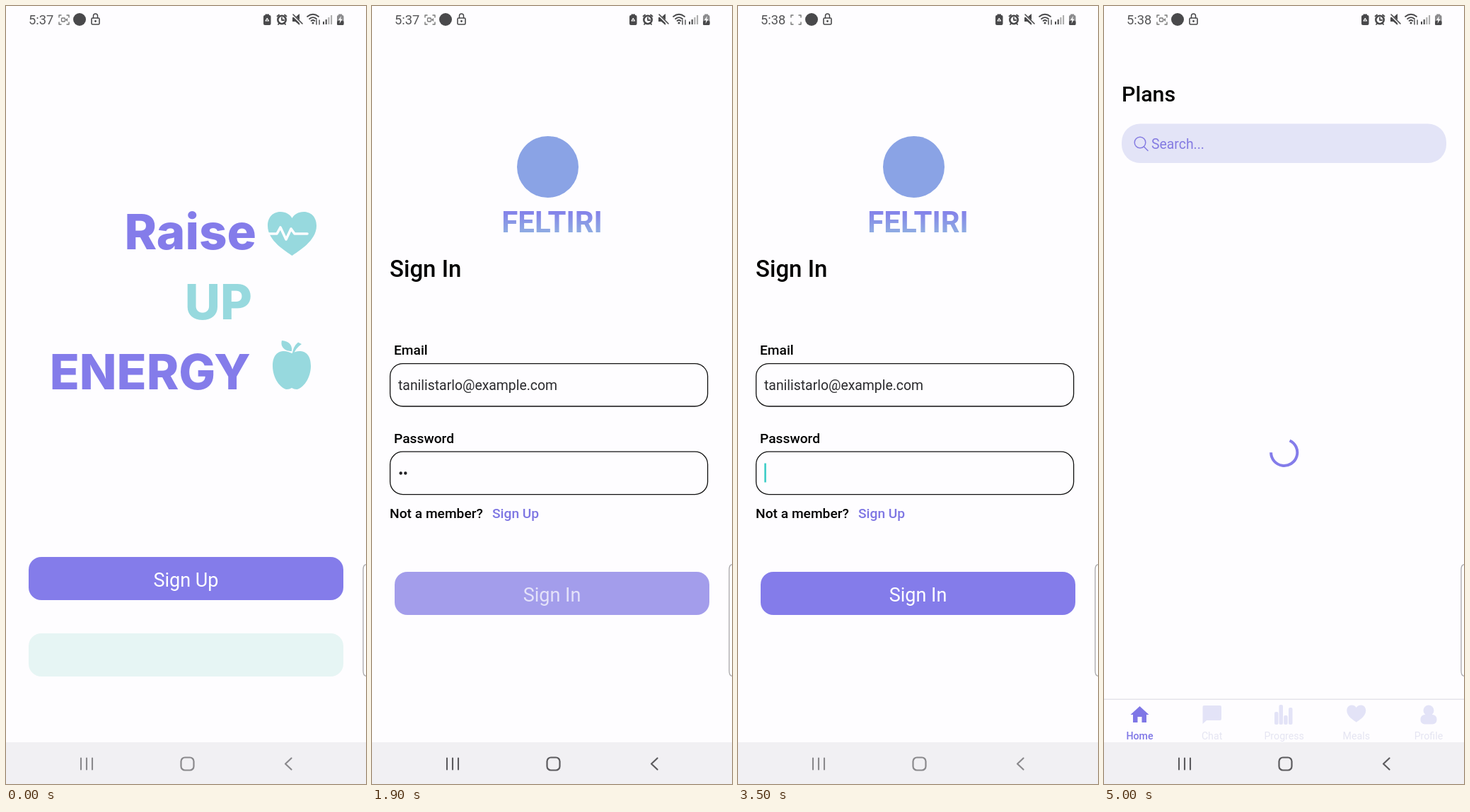
These frames come from a looping animation (509x1100 px, 5.1 s). An HTML page:

```html
<!DOCTYPE html>
<html lang="en">
<head>
<meta charset="utf-8">
<title>Sign in walkthrough</title>
<style>
html, body { margin: 0; width: 100%; height: 100%; overflow: hidden; background: #fefdff; }
svg { display: block; width: 100%; height: 100%; font-family: Roboto, sans-serif; }
</style>
</head>
<body>
<svg id="stage" viewBox="0 0 509 1100"></svg>
<script>
const STEP = 100, STEPS = 51;
const PURPLE = '#847cea', TEAL = '#97d9de', INK = '#222225';
const MAIL = 'tanilistarlo@example.com';

// Each entry changes the screen state from its step onward.
const timeline = [
  [0, { page: landing, clock: '5:37', mail: '', pw: '', focus: '', kb: 0, scroll: 0, bar: 0, caps: 1, pop: '', press: 0, nav: '#8a898c', rec: 1 }],
  [1, { page: login }],
  [3, { focus: 'mail' }],
  [4, { kb: .5 }],
  [5, { kb: 1 }],
  [9, { mail: MAIL }],
  [11, { focus: 'pw', scroll: 1, bar: 1 }],
  [13, { focus: '', pop: '1' }],
  [14, { focus: 'pw', pw: '1', pop: '2', bar: 0 }],
  [15, { pw: '•2', pop: '' }],
  [16, { pw: '••', kb: .5 }],
  [17, { kb: 0, scroll: 0, focus: '' }],
  [19, { press: 1, nav: '#5c5b5e' }],
  [21, { press: 0 }],
  [23, { nav: '#8a898c' }],
  [25, { kb: 1, scroll: 1, bar: 1, caps: 0, focus: 'pw' }],
  [26, { pw: '•' }],
  [27, { pw: '' }],
  [28, { bar: 0 }],
  [31, { clock: '5:38' }],
  [32, { kb: .5 }],
  [33, { kb: 0, scroll: 0 }],
  [35, { rec: 0 }],
  [36, { kb: 1, scroll: 1, bar: 1, rec: 1 }],
  ...[1, 2, 3, 4, 5, 6].map(n => [36 + n, { pop: '' + n, pw: typed(n - 1) }]),
  [39, { bar: 0 }],
  [43, { pop: '', pw: typed(6) }],
  [44, { pw: '••••••', kb: .5 }],
  [45, { kb: 0, scroll: 0, focus: '' }],
  [46, { press: 1, nav: '#5c5b5e' }],
  [49, { page: plans }]
];

function typed(n) { return n ? '•'.repeat(n - 1) + n : ''; }

const text = (s, x, y, size, fill = INK, more = '') =>
  `<text x="${x}" y="${y}" font-size="${size}" fill="${fill}" ${more}>${s}</text>`;
const mid = (s, x, y, size, fill, more = '') => text(s, x, y, size, fill, 'text-anchor="middle" ' + more);
const rect = (x, y, w, h, r, fill, more = '') =>
  `<rect x="${x}" y="${y}" width="${w}" height="${h}" rx="${r}" fill="${fill}" ${more}/>`;
const circle = (x, y, r, fill, more = '') => `<circle cx="${x}" cy="${y}" r="${r}" fill="${fill}" ${more}/>`;
const shape = (d, fill) => `<path d="${d}" fill="${fill}"/>`;
const line = (d, stroke, width = 2) =>
  `<path d="${d}" fill="none" stroke="${stroke}" stroke-width="${width}" stroke-linecap="round" stroke-linejoin="round"/>`;
const group = (s, more) => `<g ${more}>${s}</g>`;
const bold = 'font-weight="700"', medium = 'font-weight="500"';

const heart = 'M404.5 353C396 347 370 332 370 311C370 297 379 291 388 291C396 291 402 295 404.5 300C407 295 413 291 421 291C430 291 439 297 439 311C439 332 413 347 404.5 353Z';

function statusBar(s) {
  const c = '#49494b';
  return text(s.clock, 32, 26, 18.3, '#555557')
    + line('M75 16V13H78M86 13H89V16M89 23V26H86M78 26H75V23', '#777', 1.4)
    + (s.rec ? rect(78.5, 17, 5, 5, 1, 'none', 'stroke="#777" stroke-width="1.3"') + shape('M84 19.5L87 17V22Z', '#777') : '')
    + circle(104, 19, 9, c)
    + rect(121, 17, 11, 9, 1.5, 'none', `stroke="${c}" stroke-width="1.6"`)
    + line('M123.5 17V14Q123.5 11 126.5 11T129.5 14V17', c, 1.5) + circle(126.5, 21.5, 1.4, c)
    + rect(364, 13, 10.5, 14, 2, c) + rect(366.5, 11.5, 5.5, 3, 0, c)
    + line('M367 21L369.2 17.5L371.5 21Z', '#fff', 1.2)
    + circle(390, 19.5, 5.7, 'none', `stroke="${c}" stroke-width="2.6"`)
    + line('M390 16.5V20H393M383.5 14.5L386 12.5M396.5 14.5L394 12.5M385 26L386.5 24M395 26L393.5 24', c, 1.8)
    + shape('M405 16H409L415 11V27L409 22H405Z', c) + line('M405 12L419 26', '#fefdff', 3) + line('M406 12L419 25', c, 1.6)
    + line('M426 15Q434 8.5 442 15M429 18.2Q434 14 439 18.2M431.5 21Q434 19 436.5 21', c, 1.8)
    + circle(434, 24, 1.6, c) + line('M439 26V20M443 20V26', c, 1.4)
    + [0, 1, 2, 3].map(i => rect(448 + i * 3.7, 22 - i * 3, 2, 4 + i * 3, 0, i < 2 ? c : '#aaa')).join('')
    + rect(468, 13, 9.5, 14, 2, '#8b8b8d') + rect(470.2, 11.5, 5, 3, 0, '#8b8b8d') + rect(468, 21, 9.5, 6, 1.5, c)
    + shape('M474 14L470 20H472.5L471.5 25L475.5 18.5H473Z', '#fff');
}

function navBar(s) {
  const c = s.kb ? '#88878a' : s.nav;
  let out = s.kb ? '' : rect(0, 1041, 509, 59, 0, '#f1f0f3');
  out += line('M106 1063.5V1079.5M114 1063.5V1079.5M122 1063.5V1079.5', c, 2.1)
    + rect(247.5, 1062.5, 18, 18, 5.5, 'none', `stroke="${c}" stroke-width="2.2"`)
    + line(s.kb ? 'M391 1067.5L399.5 1076L408 1067.5' : 'M403.5 1063.5L395 1071.5L403.5 1079.5', c, 2.2);
  if (s.kb) {
    for (let i = 0; i < 15; i++) out += rect(469.5 + i % 5 * 5, 1066 + (i / 5 | 0) * 4, 2.4, 2, 0, c);
    out += rect(475, 1077.5, 12, 2, 0, c);
  }
  return out;
}

const edgeHandle = '<path d="M510 789.5Q505 789.5 505 797V940Q505 947.5 510 947.5" fill="#fff" stroke="#a8a7aa" stroke-width="1.3"/>';

function button(label, y, pressed) {
  return rect(32, y, 445, 61, 18, pressed ? '#a39deb' : PURPLE)
    + mid(label, 254.5, y + 41.5, 27, pressed ? '#e4e2f9' : '#fff');
}

function landing() {
  const word = (s, x, y, c) => text(s, x, y, 69, c, 'font-weight="800" text-anchor="end" style="font-family:Inter,sans-serif"');
  return word('Raise', 354, 344, PURPLE) + word('UP', 348, 443, TEAL) + word('ENERGY', 346, 542, PURPLE)
    + shape(heart, TEAL) + line('M371 322H383L388 313L396 330L403 315L408 322H426', '#fefdff', 3.6)
    + shape('M404 491C412 486 431 484 431 509C431 526 420 541 411 542Q407 542 404 540Q401 542 397 542C388 541 377 526 377 509C377 484 396 486 404 491Z', TEAL)
    + shape('M404 488C391 488 388 479 390 473C400 474 405 479 404 488Z', TEAL)
    + shape('M404.5 493Q406 481 413 475.5L418 478Q409 484 406.5 493Z', TEAL)
    + button('Sign Up', 779) + rect(32, 887, 445, 61, 18, '#e6f5f4');
}

function field(label, y) {
  return text(label, 31, y - 12, 19.2, '#000', medium)
    + rect(25.6, y + .6, 449, 60.4, 18, 'none', 'stroke="#111" stroke-width="1.3"');
}

function caret(x, y) { return rect(x - 1.2, y, 2.5, 27, 0, '#35cbc5'); }

function login(s) {
  const dots = s.pw.split('•').length - 1, digit = s.pw.slice(dots);
  const end = 37.5 + dots * 6.6;
  let out = '<defs><linearGradient id="fade" gradientUnits="userSpaceOnUse" x1="0" y1="289" x2="0" y2="321">'
    + '<stop stop-color="#837fea"/><stop offset="1" stop-color="#8fade2"/></linearGradient></defs>'
    + circle(248.5, 227.5, 43.5, '#8aa3e5')
    + mid('FELTIRI', 254.5, 320, 42, 'url(#fade)', bold)
    + text('Sign In', 25, 383, 33, '#000', medium)
    + field('Email', 505) + text(s.mail, 37, 543, 19.4, '#2b2b2e')
    + field('Password', 629.6);
  for (let i = 0; i < dots; i++) out += circle(40.7 + i * 6.6, 660.5, 2.2, INK);
  out += text(digit, end, 667.5, 19.4);
  if (s.focus == 'pw') out += caret(end + 1 + digit.length * 10.5, 646.5);
  if (s.focus == 'mail') out += caret(38.5 + (s.mail ? 225 : 0), 522);
  out += text('Not a member?', 25, 724, 19.2, '#000', medium)
    + text('Sign Up', 170, 724, 19.2, '#7e76e3', medium)
    + button('Sign In', 800, s.press);
  out = group(out, `transform="translate(0 ${s.scroll * -12.7})"`);
  return s.bar && s.kb ? out + rect(479, 110, 5, 438, 0, '#b5b4b8') : out;
}

function key(x, y, w, h, label, size, fill = '#fbfafd', ink = INK) {
  return rect(x, y + 1.3, w, h, 6, '#cfced2') + rect(x, y, w, h, 6, fill)
    + mid(label, x + w / 2, y + h / 2 + size * .36, size, ink);
}

function gear(cx, cy) {
  let d = '';
  for (let i = 0; i < 48; i++) {
    const a = i * Math.PI / 24, r = 9.8 + 1.2 * Math.tanh(3 * Math.cos(6 * a));
    d += (i ? 'L' : 'M') + (cx + r * Math.sin(a)).toFixed(1) + ' ' + (cy - r * Math.cos(a)).toFixed(1);
  }
  return line(d + 'Z', INK, 2) + circle(cx, cy, 3.6, 'none', `stroke="${INK}" stroke-width="2"`);
}

function keyboard(s) {
  const pitch = 49.6, w = 42.5, gray = '#cbcacd', pale = '#bebdc0', blue = '#1479e0';
  const row = (chars, x, y, h, size) => [...chars].map((c, i) => key(x + i * pitch, y, w, h, c, size)).join('');
  const letters = (chars, x, y) => row(s.caps ? chars : chars.toLowerCase(), x, y, 52, s.caps ? 28 : 30);
  let out = rect(0, 679, 509, 421, 0, '#e4e3e6') + rect(0, 679, 509, 48, 0, '#ebeaed')
    + circle(55.5, 703, 10.3, 'none', `stroke="${pale}" stroke-width="1.7"`)
    + circle(51.5, 700, 1.4, pale) + circle(59.5, 700, 1.4, pale) + line('M50.5 706Q55.5 711 60.5 706', pale, 1.7)
    + line('M161 693H175Q178 693 178 696V704L169 713H161Q158 713 158 710V696Q158 693 161 693M178 704H172Q169 704 169 707V713M163 706Q165 709 168 707', pale, 1.7)
    + circle(164, 700, 1.3, pale) + circle(172, 700, 1.3, pale)
    + rect(276.5, 692.5, 7, 13.5, 3.5, 'none', `stroke="${pale}" stroke-width="1.7"`)
    + line('M272.5 702Q273 709 280 709T287.5 702M280 709V713', pale, 1.7)
    + gear(391.5, 703)
    + [472, 479, 486].map(x => circle(x, 703.5, 2.3, INK)).join('')
    + row('1234567890', 10, 738, 41, 27)
    + letters('QWERTYUIOP', 10, 788) + letters('ASDFGHJKL', 35.5, 849.5) + letters('ZXCVBNM', 85, 911)
    + key(10, 911, 60, 52, '', 1, gray)
    + line('M40 925.5L51 937.5H45.3V948H34.7V937.5H29Z', s.caps ? blue : INK, 2)
    + key(439.5, 911, 59.5, 52, '', 1, gray)
    + line('M456 937L463.5 928H480Q482.5 928 482.5 930V944Q482.5 946 480 946H463.5ZM468 933.5L475 940.5M475 933.5L468 940.5', INK, 2)
    + key(10, 972, 67, 53, '!#1', 24, gray)
    + key(85, 972, 41.5, 53, '', 1) + mid(',', 106, 1013, 31, INK, medium)
    + key(135, 972, 239.5, 53, 'English (UK)', 16.6)
    + line('M169.5 993.5L164.5 998.5L169.5 1003.5M340 993.5L345 998.5L340 1003.5', INK, 1.9)
    + key(383, 972, 41.5, 53, '', 1) + mid('.', 403.5, 1011, 31, INK, medium)
    + key(432, 972, 67, 53, 'Done', 19.6, gray, blue);
  if (s.pop) {
    const x = Math.max(10, 31.3 + (s.pop - 1) * pitch - 38.3);
    out += rect(x - 1, 630, 78.5, 100.5, 10, '#d3d2d6', 'opacity=".7"') + rect(x, 630, 76.5, 98.5, 10, '#fbfafc')
      + mid(s.pop, x + 38.3, 697, 43);
  }
  return out;
}

function plans(s, step) {
  const pale = '#e3e3f7', a = step == 50 ? -65 : -150, sweep = step == 50 ? 245 : 200;
  const at = deg => `${254.7 + 18.6 * Math.cos(deg * Math.PI / 180)} ${631.3 + 18.6 * Math.sin(deg * Math.PI / 180)}`;
  return text('Plans', 25, 135, 30.3, '#000', medium)
    + rect(25, 166.5, 459, 55.5, 26, '#e3e4f7')
    + circle(51, 193, 7.8, 'none', 'stroke="#857ce2" stroke-width="1.5"') + line('M56.5 199L62 204.5', '#857ce2', 1.5)
    + text('Search...', 67, 202, 19.4, '#857ce2')
    + `<path d="M${at(a)}A18.6 18.6 0 1 1 ${at(a + sweep)}" fill="none" stroke="${PURPLE}" stroke-width="4"/>`
    + rect(0, 979.5, 509, 1.5, 0, '#e5e4ea')
    + shape('M50.5 990L63.5 1002H60V1013H53.5V1005H47.5V1013H41V1002H37.5Z', '#7f77e6')
    + shape('M141.5 989H164Q166 989 166 991V1008Q166 1010 164 1010H145L139.5 1015V991Q139.5 989 141.5 989Z', pale)
    + rect(241, 998, 5.5, 18, 2, pale) + rect(247.5, 988, 5.5, 28, 2, pale)
    + rect(254.2, 1003, 5.5, 13, 2, pale) + rect(261, 992, 5.5, 24, 2, pale)
    + group(shape(heart, pale), 'transform="translate(199 875) scale(.39)"')
    + circle(459, 996, 7.5, pale) + rect(447.5, 1002, 23, 13.5, 6, pale)
    + ['Home', 'Chat', 'Progress', 'Meals', 'Profile'].map((label, i) =>
      mid(label, 50.5 + i * 102.1, 1037, 14.2, i ? '#e5e5f2' : '#7f77e6', i ? '' : medium)).join('');
}

const stage = document.getElementById('stage');
let shown = -1;

function draw(now) {
  const step = Math.floor(now / STEP) % STEPS;
  if (step != shown) {
    shown = step;
    const s = Object.assign({}, ...timeline.filter(([at]) => at <= step).map(([, change]) => change));
    const panel = s.kb ? group(keyboard(s), `transform="translate(0 ${(1 - s.kb) * 421})"`) : '';
    stage.innerHTML = rect(0, 0, 509, 1100, 0, '#fefdff') + s.page(s, step) + statusBar(s) + panel + edgeHandle + navBar(s);
  }
  requestAnimationFrame(draw);
}
draw(performance.now());
</script>
</body>
</html>
```
